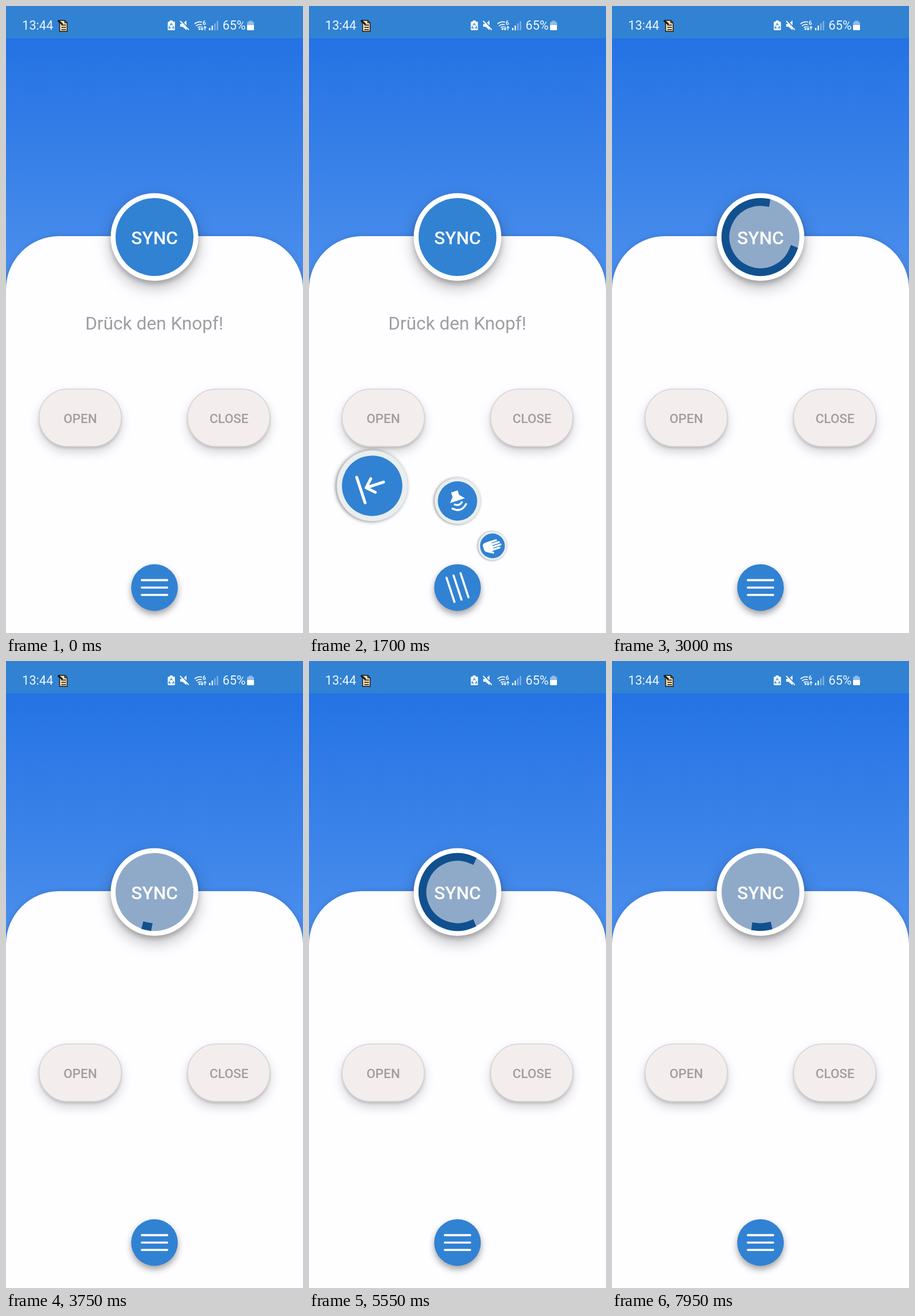
Animation of 515x1087 px, one loop 8000 ms. Source, as an HTML page:

```html
<!DOCTYPE html>
<html lang="de">
<head>
<meta charset="utf-8">
<title>Sync</title>
<style>
  html, body { margin: 0; height: 100%; overflow: hidden; background: #fefdff; }
  svg { display: block; width: 100vw; height: 100vh; font-family: Roboto, sans-serif; }
  .line { fill: none; stroke: #fff; stroke-linecap: round; stroke-linejoin: round; }
  .pill { fill: #f3eeed; stroke: #d8d3d2; stroke-width: 1.5; filter: drop-shadow(0 3px 2px rgba(0,0,0,.14)) drop-shadow(0 9px 9px rgba(0,0,0,.16)); }
  .label { font-size: 22.3px; font-weight: 500; fill: #a19e9e; text-anchor: middle; }
  .status { font-size: 21.6px; fill: #f1f7fd; }
  .ring { fill: #e9eeee; filter: drop-shadow(0 1px 2px rgba(0,0,0,.5)); }
  .blue { fill: #3182d3; }
  #card { fill: #fefdff; filter: drop-shadow(0 0 5px rgba(0,0,0,.14)); }
  #rim { fill: #fff; filter: drop-shadow(0 5px 4px rgba(0,0,0,.2)) drop-shadow(0 11px 13px rgba(0,0,0,.26)); }
  #fab { filter: drop-shadow(0 6px 6px rgba(0,0,0,.36)); }
</style>
</head>
<body>
<svg viewBox="0 0 515 1087" preserveAspectRatio="none">
  <defs>
    <linearGradient id="sky" gradientUnits="userSpaceOnUse" x1="0" y1="56" x2="0" y2="440">
      <stop stop-color="#2472e4"/><stop offset="1" stop-color="#488dec"/>
    </linearGradient>
  </defs>
  <rect y="50" width="515" height="450" fill="url(#sky)"/>
  <rect class="blue" width="515" height="56"/>

  <g id="statusbar">
    <text class="status" x="28" y="41">13:44</text>
    <g stroke="#1b1713" stroke-width="1.4">
      <path d="M92 25h10l4 4v15H93V33z" fill="#f6dfb2"/>
      <path d="M96 33h8M96 37h8M96 41h8M102 25v4h4" fill="none"/>
      <path d="M90 25l8 7" stroke-width="3"/>
    </g>
    <path d="M284 25h5v2h2.500q1.500 0 1.500 1.500v12q0 1.500-1.500 1.500h-9.500q-1.500 0-1.500-1.500v-12q0-1.500 1.500-1.500h2z" fill="#f1f7fd"/>
    <path d="M284.500 33.500l2-3 2 3M290 35l1 3h-3M285.500 38h-3l1-3" fill="none" stroke="#3182d3" stroke-width="1.300"/>
    <path d="M302 31h4l7-6v17l-7-6h-4z" fill="#f1f7fd"/>
    <path d="M303 25l15 15" stroke="#3182d3" stroke-width="2"/>
    <path d="M302 26l15 15.500" stroke="#f1f7fd" stroke-width="2"/>
    <g fill="none" stroke="#f1f7fd" stroke-width="1.700">
      <path d="M327 31q6-5 13-3M329.500 34.500q5-4 10-2M332.500 37.500q3-2 6-1"/>
      <path d="M340 35v6m-2.200-2l2.200 2.500 2.200-2.500M345 42v-6m-2.200 2l2.200-2.500 2.200 2.500" stroke-width="1.400"/>
    </g>
    <circle cx="335.500" cy="40" r="1.800" fill="#f1f7fd"/>
    <text x="341" y="33" font-size="10" font-weight="700" fill="#f1f7fd">6</text>
    <path d="M353.200 42v-4M357.700 42v-8" stroke="#f1f7fd" stroke-width="2.400"/>
    <path d="M362.200 42v-12M366.700 42v-16" stroke="#82b4e4" stroke-width="2.400"/>
    <text class="status" x="375.500" y="41">65%</text>
    <path d="M421 25.500h6v2h1.500q1.500 0 1.500 1.500v4h-12v-4q0-1.500 1.500-1.500h1.500z" fill="#8fbce8"/>
    <path d="M418 33h12v7.500q0 1.500-1.500 1.500h-9q-1.500 0-1.500-1.500z" fill="#fff"/>
  </g>

  <path id="card" d="M0 1100V491A92 92 0 0 1 92 399H423A92 92 0 0 1 515 491V1100z"/>

  <g transform="translate(257.500 400.500)">
    <circle id="rim" r="76"/>
    <circle id="disc" r="67.500"/>
    <circle id="arc" r="60.750" pathLength="360" fill="none" stroke="#11508f" stroke-width="13.500" stroke-linecap="square"/>
    <text y="12" font-size="31.500" font-weight="500" fill="#fff" text-anchor="middle">SYNC</text>
  </g>
  <text id="hint" x="257.200" y="561" font-size="31.400" fill="#a09fa0" text-anchor="middle">Drück den Knopf!</text>

  <rect class="pill" x="57.500" y="664" width="142.500" height="99.500" rx="49.750"/>
  <rect class="pill" x="315" y="664" width="142.500" height="99.500" rx="49.750"/>
  <text class="label" x="128.700" y="722.500">OPEN</text>
  <text class="label" x="386.700" y="722.500">CLOSE</text>

  <g class="item">
    <circle class="ring" r="37"/><circle class="blue" r="31.500"/>
    <path class="line" d="M0-12.500V6M-7.500-1L0 6.500 7.500-1M-13.500 12.500h28" stroke-width="3"/>
  </g>
  <g class="item">
    <circle class="ring" r="37"/><circle class="blue" r="31.500"/>
    <path d="M-16-5.500h7.500L-.5-12.500v25L-8.500 5.500H-16z" fill="#fff"/>
    <path class="line" d="M4-6q5 6 0 12M9-11.500q11 11.500 0 23" stroke-width="3"/>
  </g>
  <g class="item">
    <circle class="ring" r="37"/><circle class="blue" r="31.500"/>
    <path class="line" d="M-10.800-13V8M-4-18.500V4M3-20.500V4M9.700-15.500V8" stroke-width="5"/>
    <path class="line" d="M10 15L17 3.500" stroke-width="5"/>
    <path d="M-13.300 0H12.200V8L14 11 10 20Q7 23.500 3 23.500H-6Q-13.300 23.500-13.300 14z" fill="#fff"/>
  </g>

  <g id="fab">
    <circle class="blue" r="40.500"/>
    <path class="line" d="M-22-12.800h44M-22 0h44M-22 12.800h44" stroke-width="3.600"/>
  </g>
</svg>
<script>
  const LOOP = 8000, OPEN = 200, CLOSE = 1500, MENU_TIME = 350;
  const SPIN_SHOW = 2500, SPIN_START = 2514, ARC_PERIOD = 1333, TURN_PERIOD = 2222;
  const FAB_X = 257.5, FAB_Y = 1008.2, REACH = 138.5;

  const byId = id => document.getElementById(id);
  const clamp = x => Math.min(1, Math.max(0, x));

  // Cubic timing curve, solved by bisection.
  const bezier = (x1, y1, x2, y2) => x => {
    if (x <= 0 || x >= 1) return clamp(x);
    const at = (s, a, b) => 3 * (1 - s) ** 2 * s * a + 3 * (1 - s) * s * s * b + s ** 3;
    let lo = 0, hi = 1;
    for (let i = 0; i < 24; i++) {
      const mid = (lo + hi) / 2;
      if (at(mid, x1, x2) < x) lo = mid; else hi = mid;
    }
    return at(lo, y1, y2);
  };
  const fastOutSlowIn = bezier(.4, 0, .2, 1);
  const easeOut = bezier(0, 0, .58, 1);

  // Rises to a peak, then settles at 1.
  const overshoot = (x, peak, split) =>
    x < split ? peak * x / split : peak + (1 - peak) * (x - split) / (1 - split);

  const items = [
    { angle: 230, peak: 1.75, split: .35 },
    { angle: 270, peak: 1.4, split: .55 },
    { angle: 310, peak: 1.2, split: .75 }
  ];
  document.querySelectorAll(".item").forEach((node, i) => items[i].node = node);

  function drawMenu(t) {
    const x = clamp((t - OPEN) / MENU_TIME) - clamp((t - CLOSE) / MENU_TIME);
    const turn = 180 * (1 - easeOut(x));
    for (const { node, angle, peak, split } of items) {
      const v = overshoot(x, peak, split), a = angle * Math.PI / 180;
      const px = FAB_X + REACH * v * Math.cos(a), py = FAB_Y + REACH * v * Math.sin(a);
      node.setAttribute("transform", `translate(${px} ${py}) rotate(${turn}) scale(${v})`);
      node.style.display = x > 0 ? "" : "none";
    }
    byId("fab").setAttribute("transform", `translate(${FAB_X} ${FAB_Y})`);
    byId("fab").lastElementChild.setAttribute("transform", `rotate(${turn})`);
  }

  function drawSpinner(t) {
    const busy = t >= SPIN_SHOW;
    byId("hint").style.display = busy ? "none" : "";
    byId("arc").style.display = busy ? "" : "none";
    byId("disc").setAttribute("fill", busy ? "#8faac8" : "#3182d3");
    if (!busy) return;
    const elapsed = Math.max(0, t - SPIN_START);
    const phase = elapsed % ARC_PERIOD / ARC_PERIOD;
    const head = fastOutSlowIn(clamp(phase * 2));
    const tail = fastOutSlowIn(clamp(phase * 2 - 1));
    const start = -90 + 270 * tail + 90 * phase + 360 * elapsed / TURN_PERIOD;
    const sweep = Math.max(270 * (head - tail), .06);
    byId("arc").setAttribute("transform", `rotate(${start})`);
    byId("arc").setAttribute("stroke-dasharray", `${sweep} ${360 - sweep}`);
  }

  const begin = performance.now();
  function draw() {
    const t = (performance.now() - begin) % LOOP;
    drawMenu(t);
    drawSpinner(t);
    requestAnimationFrame(draw);
  }
  draw();
</script>
</body>
</html>
```
